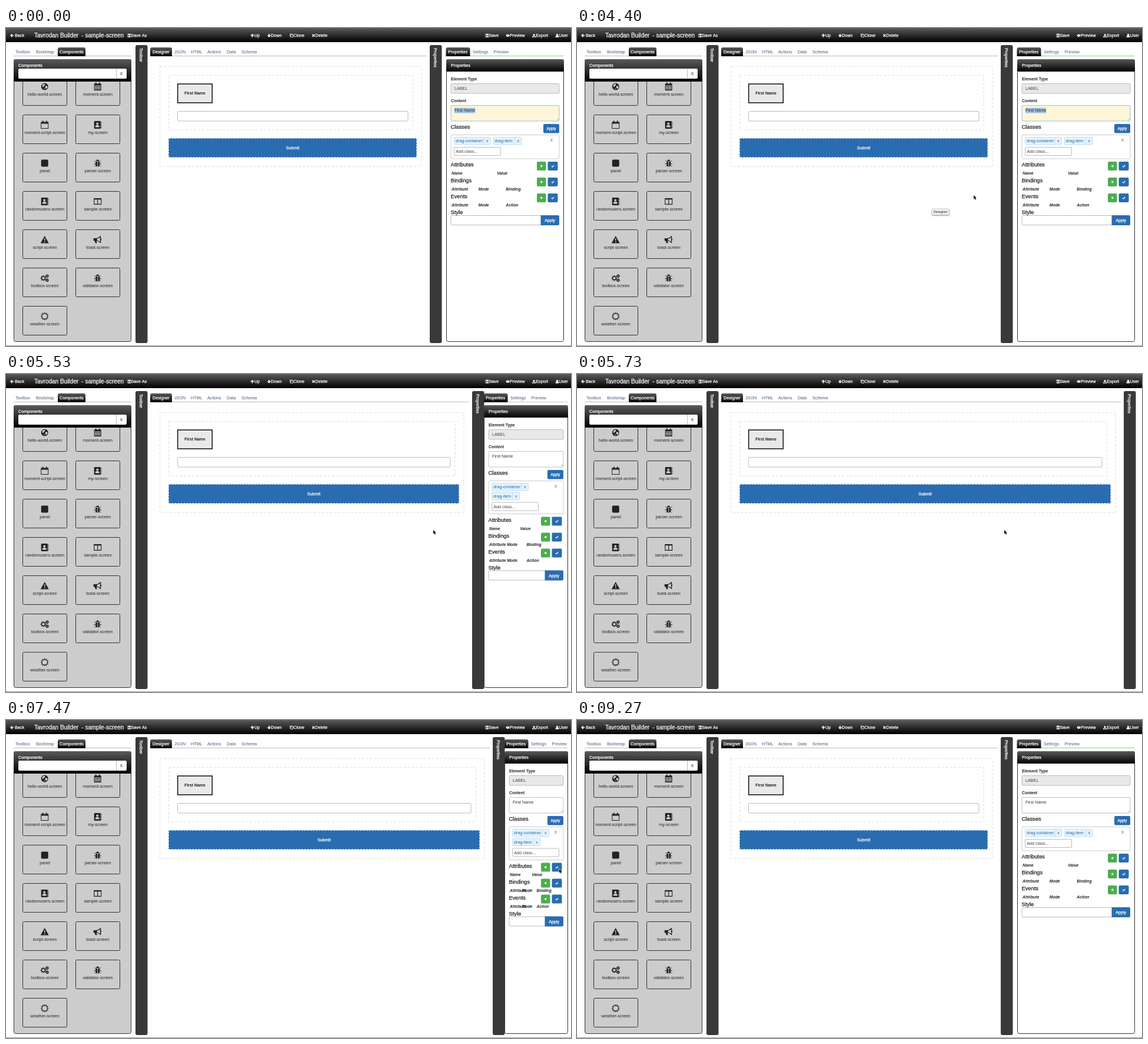
Write an HTML page with a canvas that moves like this. It is 960 px wide and 540 px high and loops after 9730 ms.

```html
<!DOCTYPE html>
<html lang="en">
<head>
<meta charset="utf-8">
<title>Screen designer</title>
<style>
html, body { margin: 0; width: 100%; height: 100%; overflow: hidden; background: #fff; }
canvas { display: block; width: 960px; height: 540px; }
</style>
</head>
<body>
<canvas id="stage" width="960" height="540"></canvas>
<script>
const ctx = document.getElementById('stage').getContext('2d');
const LOOP = 9730, STEP = 200 / 3;
const FACE = '"Liberation Sans", Arial, sans-serif';
const BODY = '7.2px ' + FACE, BOLD = 'bold 6.9px ' + FACE, SLANT = 'italic bold 6.8px ' + FACE;
const HEAD = '9.3px ' + FACE, TITLE = '10px ' + FACE;
const INK = '#222', WHITE = '#fff', LINK = '#465a78', BLUE = '#2a6cb0', GREEN = '#4bae4f';

// Light text on dark and headings get a hairline stroke for weight
function txt(s, x, y, color = INK, font = BODY, align = 'left') {
  ctx.font = font;
  ctx.textAlign = align;
  ctx.fillStyle = ctx.strokeStyle = color;
  ctx.fillText(s, x, y);
  if (color === WHITE || font === HEAD) {
    ctx.lineWidth = .25;
    ctx.strokeText(s, x, y);
  }
}

function box(x, y, w, h, r, fill, line, lw = 1) {
  ctx.beginPath();
  ctx.roundRect(x, y, w, h, r);
  if (fill) { ctx.fillStyle = fill; ctx.fill(); }
  if (line) { ctx.strokeStyle = line; ctx.lineWidth = lw; ctx.stroke(); }
}

function shade(y, h) {
  const g = ctx.createLinearGradient(0, y, 0, y + h);
  g.addColorStop(0, '#5a5a5a');
  g.addColorStop(1, '#000');
  return g;
}

function rule(x1, x2, y, color) {
  ctx.fillStyle = color;
  ctx.fillRect(x1, y, x2 - x1, 1);
}

function dashed(x, y, w, h, color, dash) {
  ctx.setLineDash(dash);
  ctx.strokeStyle = color;
  ctx.lineWidth = 1;
  ctx.strokeRect(x, y, w, h);
  ctx.setLineDash([]);
}

function at(x, y, draw) {
  ctx.save();
  ctx.translate(x, y);
  draw();
  ctx.restore();
}

// Icons: [filled path, stroked path, line width], centred on 0,0
const disc = (x, y, r) => `M${x - r} ${y}a${r} ${r} 0 1 0 ${2 * r} 0a${r} ${r} 0 1 0 ${-2 * r} 0z`;

function rays(x, y, n, r1, r2) {
  let d = '';
  for (let i = 0; i < n; i++) {
    const a = i * 2 * Math.PI / n, c = Math.cos(a), s = Math.sin(a);
    d += `M${x + c * r1} ${y + s * r1}L${x + c * r2} ${y + s * r2}`;
  }
  return d;
}

const gear = (x, y, r) => disc(x, y, r * .62) + rays(x, y, 8, r * .7, r);

function cells() {
  let d = '';
  for (let i = 0; i < 12; i++) d += `M${-5 + i % 4 * 2.6} ${-2 + (i >> 2) * 2.5}h2v1.8h-2z`;
  return d;
}

const TABS = 'M-4-7h2v2h-2zM2-7h2v2h-2z';
const ICON = {
  globe: [disc(0, 0, 6) + 'M-4-3l3-2 2 1-1 2-2 1 0 2-2-1zM1-1l3 0 1 2-2 3-2-2zM-2 3l2 0 0 2z'],
  calendar: ['M-6-5h12v11.5h-12z' + cells() + TABS],
  calendarO: ['M-6.5-5h13v11.5h-13zM-5.5-2h11v7.5h-11z' + TABS],
  book: ['M-5-6.5h10v13h-10q-1 0-1-1v-11q0-1 1-1zM5.6-5h1v2.5h-1zM5.6-1h1v2.5h-1zM5.6 3h1v2.5h-1z'
    + disc(-.5, -2, 2) + 'M-4 4q0-3.5 2-3.5h3q2 0 2 3.5z'],
  square: ['M-4-6h8q2 0 2 2v8q0 2-2 2h-8q-2 0-2-2v-8q0-2 2-2z'],
  bug: ['M-3.5-2.5h3v8.5q-3 0-3-4zM.5-2.5h3v4.5q0 4-3 4zM-2.6-3.2q0-2.8 2.6-2.8t2.6 2.8z',
    'M-3-2l-2.3-2.3M3-2l2.3-2.3M-3.5 1.2h-2.8M3.5 1.2h2.8M-3 3.6l-2.2 2.2M3 3.6l2.2 2.2', 1],
  columns: ['M-6.5-5.5h13v11h-13zM-5.4-3.2h4.8v7.5h-4.8zM.6-3.2h4.8v7.5h-4.8z'],
  warning: ['M0-6.5l7 12.5h-14zM-.9-2.2h1.8l-.3 4h-1.2zM-.8 2.8h1.6v1.6h-1.6z'],
  horn: ['M-7-2.5h5q4-1 6.5-3.7h1v4q2 1.7 0 3.6v4h-1q-2.5-2.8-6.5-3.6l1 4h-2.8l-1.4-4h-1.8zM-1-1.6v2.6q3 .6 5.2 2.4v-7.4q-2.2 1.8-5.2 2.4z'],
  cogs: ['', gear(-2.3, .3, 4.8) + gear(4.2, -3.3, 2.7) + gear(4.2, 3.8, 2.7), 1.5],
  sun: ['', disc(0, 0, 4.7) + rays(0, 0, 12, 5, 6.8), 1.2],
  left: ['M-3 0l3-3 1 1-1.2 1.2h3.2v1.6h-3.2l1.2 1.2-1 1z'],
  save: ['M-3-3h5l1 1v5h-6zM-2.3-2.3v4.6h4.6v-4h-.8v1.5h-3v-2.1zM-1.4 .6h2.8v1.7h-2.8z'],
  clone: ['M-3-3h4.5v1.3h1.5v4.7h-4.5v-1.3h-1.5zM-2.3-2.3v3.3h.8v-2.7h2.3v-.6zM-.8-1v3.3h3.1v-3.3z'],
  times: ['', 'M-2-2l4 4M2-2l-4 4', 1.6],
  eye: ['M-3.3 0q3.3-4.6 6.6 0q-3.3 4.6-6.6 0z' + disc(0, -.2, .7)],
  upload: ['M0-3l2.3 2.3h-1.4v2h-1.8v-2h-1.4zM-3 1h1.6v1h2.8v-1h1.6v2h-6z'],
  user: [disc(0, -1.4, 1.7) + 'M-2.9 3q0-3 1.5-3q1.4 1 2.8 0q1.5 0 1.5 3z'],
  plus: ['', 'M-2 0h4M0-2v4', 1.4],
  check: ['', 'M-2 0l1.5 1.6L2.2-1.6', 1.3]
};

function icon(name, x, y, color = INK, turn = 0) {
  const [fill, line, lw] = ICON[name];
  at(x, y, () => {
    ctx.rotate(turn);
    if (fill) { ctx.fillStyle = color; ctx.fill(new Path2D(fill), 'evenodd'); }
    if (line) { ctx.strokeStyle = color; ctx.lineWidth = lw; ctx.stroke(new Path2D(line)); }
  });
}

function topBar() {
  ctx.fillStyle = shade(0, 24);
  ctx.fillRect(0, 0, 960, 24);
  txt('Tavrodan Builder', 48, 16, WHITE, TITLE);
  txt('- sample-screen', 200, 16, WHITE, TITLE, 'right');
  const items = [
    ['left', 10, 'Back', 15], ['save', 209.5, 'Save As', 212.5], ['left', 418.5, 'Up', 422, Math.PI / 2],
    ['left', 447, 'Down', 450, -Math.PI / 2], ['clone', 485, 'Clone', 488.3], ['times', 522.5, 'Delete', 525.5],
    ['save', 817.5, 'Save', 820.5], ['eye', 852.5, 'Preview', 856], ['upload', 897, 'Export', 900.3], ['user', 936.5, 'User', 939.5]
  ];
  for (const [name, ix, label, x, turn] of items) {
    icon(name, ix, 12.8, WHITE, turn);
    txt(label, x, 15.2, WHITE);
  }
}

function tab(x, w, label, tx) {
  box(x, 33, w, 15, [3, 3, 0, 0], shade(33, 15));
  txt(label, tx, 43.2, WHITE);
}

function panel(x, w, headH, fill) {
  box(x + .5, 53.5, w - 1, 479, 3, fill, '#333');
  box(x, 53, w, headH, [3, 3, 0, 0], shade(53, headH));
}

const TILES = [
  ['hello-world-screen', 'globe'], ['moment-screen', 'calendar'], ['moment-script-screen', 'calendarO'], ['my-screen', 'book'],
  ['panel', 'square'], ['parser-screen', 'bug'], ['randomusers-screen', 'book'], ['sample-screen', 'columns'],
  ['script-screen', 'warning'], ['toast-screen', 'horn'], ['toolbox-screen', 'cogs'], ['validator-screen', 'bug'], ['weather-screen', 'sun']
];

function leftPanel() {
  txt('Toolbox', 16, 43.2, LINK);
  txt('Bootstrap', 51, 43.2, LINK);
  rule(13, 213, 47, '#bbb');
  tab(88, 47, 'Components', 91);
  panel(13, 200, 38, '#ccc');
  txt('Components', 21, 66.3, WHITE);
  box(21, 69, 184, 17, 2, WHITE);
  ctx.fillStyle = '#bbb';
  ctx.fillRect(187, 69, 1, 17);
  txt('X', 196, 80.3, INK, BODY, 'center');
  ctx.save();
  ctx.beginPath();
  ctx.rect(13, 91, 200, 441);
  ctx.clip();
  TILES.forEach(([label, name], i) => {
    const x = 28 + i % 2 * 90, y = 82 + (i >> 1) * 65;
    box(x + .5, y + .5, 75, 49, 2, null, '#333');
    icon(name, x + 37.7, y + 17.5);
    txt(label, x + 38, y + 33.3, INK, BODY, 'center');
  });
  ctx.restore();
}

function sideBar(x, label) {
  box(x, 29, 20.5, 506, 3, '#393939');
  at(x + 7.3, 34, () => {
    ctx.rotate(Math.PI / 2);
    txt(label, 0, 0, WHITE);
  });
}

function designer(edge) {
  [['JSON', 286], ['HTML', 314], ['Actions', 342], ['Data', 375], ['Schema', 400]]
    .forEach(([s, x]) => txt(s, x, 43.2, LINK));
  rule(245, edge - 5, 47, '#bbb');
  tab(245, 37, 'Designer', 249);
  dashed(261.5, 65.5, edge - 275.5, 170, '#ddd', [4, 3]);
  dashed(276.5, 80.5, edge - 305.5, 92.5, '#ddd', [4, 3]);
  box(291.7, 95, 58.6, 32, 0, '#e9e9e9', '#111', 1.5);
  txt('First Name', 321, 113.3, INK, BOLD, 'center');
  box(291.5, 141.5, edge - 328.5, 16.5, 2, WHITE, '#bbb');
  box(276, 187, edge - 298, 33, 2, BLUE);
  dashed(276.5, 187.5, edge - 299, 32, '#cfdeee', [3, 2]);
  txt('Submit', (254 + edge) / 2, 206.2, WHITE, BODY, 'center');
}

function tag(s, x, y, w) {
  box(x + .5, y + .5, w - 1, 12.5, 1.5, '#e6f3fc', '#bcdcf0');
  ctx.fillStyle = '#bcdcf0';
  ctx.fillRect(x + w - 12.5, y + 1, 1, 12);
  txt(s, x + 3, y + 9, '#1b6aa8');
  txt('x', x + w - 6.2, y + 9, '#1b6aa8', BODY, 'center');
}

function propsPanel(l, r, focus, moving) {
  const w = r - l, x = l + 8, fw = w - 15.5;
  if (w < 20) return;
  ctx.save();
  ctx.beginPath();
  ctx.rect(l - 1, 29, w + 2, 506);
  ctx.clip();
  txt('Settings', l + 45, 43.2, LINK);
  txt('Preview', l + 80.5, 43.2, LINK);
  rule(l, r, 47, moving ? '#dcb4dc' : '#8fd08a');
  tab(l - .5, 41, 'Properties', l + 3.3);
  panel(l, Math.round(w), 21, WHITE);
  txt('Properties', x, 66.3, WHITE);

  txt('Element Type', x, 89.3, INK, BOLD);
  box(x, 94.5, fw, 16.5, 2, '#e9e9e9', '#bbb');
  txt('LABEL', l + 14, 105.3, '#444');
  txt('Content', x, 126.3, INK, BOLD);
  box(x, 131.5, fw, 26.5, 2, focus ? '#fff5d9' : WHITE, focus ? '#93c3da' : moving ? '#accbd8' : '#bbb');
  if (focus) {
    ctx.fillStyle = '#9dbfe0';
    ctx.fillRect(l + 14, 135.5, 35, 9);
  }
  txt('First Name', l + 14, 142.3, '#333');
  ctx.strokeStyle = '#999';
  ctx.lineWidth = .6;
  ctx.stroke(new Path2D(`M${r - 12} 157l4-4M${r - 10} 157l2-2`));

  txt('Classes', l + 7.5, 171.3, INK, HEAD);
  box(r - 34.5, 163, 27, 15.5, 2, BLUE);
  txt('Apply', r - 21, 173, WHITE, '6.3px ' + FACE, 'center');
  const wrap = w < 155, dy = wrap ? 15.5 : 0;
  box(x, 181.5, fw, 40.5 + dy, 2, WHITE, '#ccc');
  tag('drag-container', l + 13, 185, 63);
  if (wrap) tag('drag-item', l + 13, 200.5, 48);
  else tag('drag-item', l + 79.5, 185, 49);
  txt('X', r - 20.5, 193.2, '#555', '6.5px ' + FACE, 'center');
  box(l + 13.5, 202.5 + dy, 79, 14, 1.5, WHITE, '#bbb');
  txt('Add class...', l + 16.3, 212 + dy, '#444');

  const groups = [
    ['Attributes', [['Name', 0], ['Value', .432]]],
    ['Bindings', [['Attribute', 0], ['Mode', .275], ['Binding', .508]]],
    ['Events', [['Attribute', 0], ['Mode', .275], ['Action', .508]]]
  ];
  groups.forEach(([name, cols], i) => {
    const y = 227 + dy + i * 27;
    txt(name, l + 7.5, y + 8.3, INK, HEAD);
    box(r - 45.5, y, 15.5, 15, 2, GREEN);
    icon('plus', r - 37.7, y + 7.5, WHITE);
    box(r - 27, y, 17, 15, 2, BLUE);
    icon('check', r - 18.5, y + 7.5, WHITE);
    for (const [s, k] of cols) txt(s, k ? l + k * w : l + 9, y + 22.2, INK, SLANT);
  });
  txt('Style', l + 7.5, 316.3 + dy, INK, HEAD);
  box(x, 318.5 + dy, fw - 4, 16, 2, WHITE, '#bbb');
  box(r - 39, 318 + dy, 31.5, 17, [0, 2, 2, 0], BLUE);
  txt('Apply', r - 23.3, 329 + dy, WHITE, BODY, 'center');
  ctx.restore();
}

function tooltip(alpha) {
  ctx.save();
  ctx.globalAlpha = alpha;
  ctx.shadowColor = 'rgba(0,0,0,.45)';
  ctx.shadowBlur = 2;
  ctx.shadowOffsetY = 1;
  box(603, 307, 29.5, 10.5, 1.5, '#f0f0f0');
  ctx.shadowColor = 'transparent';
  box(603, 307, 29.5, 10.5, 1.5, null, '#b5b5b5', .6);
  txt('Designer', 617.7, 314.3, INK, '6px ' + FACE, 'center');
  ctx.restore();
}

// Pointer path: time, x, y, eased arrival
const PATH = [
  [2533, 287, 514], [2930, 388, 333, 1], [3333, 388, 333], [3930, 596, 292, 1], [4200, 606, 290], [4330, 646, 288],
  [4400, 674, 284], [4700, 718, 269], [5330, 726, 265], [6200, 726, 265], [6930, 940, 253, 1],
  [8333, 940, 253], [8670, 570, 320, 1], [8800, 479, 309], [9200, 479, 309]
];

function pointer(t) {
  for (let i = 1; i < PATH.length; i++) {
    const [t1, x1, y1] = PATH[i - 1], [t2, x2, y2, ease] = PATH[i];
    if (t > t2) continue;
    let k = Math.max(0, (t - t1) / (t2 - t1));
    if (ease) k = k * k * (3 - 2 * k);
    return [x1 + (x2 - x1) * k, y1 + (y2 - y1) * k];
  }
}

const ARROW = new Path2D('M0 0v6.6l1.6-1.4 1.2 2.6 1.2-.6-1.2-2.5h2.1z');
const HAND = new Path2D('M-1 0q1-.8 1.5 0l.3 2.5 2.8.6q1 .3.9 1.5l-.9 3h-3.6l-2.4-3.2q0-1 1-.7l.6.5z');

function drawPointer(t, barX) {
  const [x, y] = pointer(t);
  const hand = x >= barX && x <= barX + 20;
  at(x, y, () => {
    ctx.lineJoin = 'round';
    ctx.lineWidth = hand ? .7 : 1.2;
    ctx.strokeStyle = hand ? '#222' : WHITE;
    ctx.fillStyle = hand ? WHITE : '#000';
    ctx.stroke(hand ? HAND : ARROW);
    ctx.fill(hand ? HAND : ARROW);
  });
}

const swing = p => .5 - Math.cos(Math.PI * Math.min(1, Math.max(0, p))) / 2;

function draw(t) {
  const closing = t > 5440 ? swing((t - 5376) / 400) : 0;
  const shut = closing - swing((t - 7266.6) / 400);
  const barX = Math.round(720 + 215 * shut);
  const moving = shut > .001 && shut < .999;
  ctx.fillStyle = WHITE;
  ctx.fillRect(0, 0, 960, 540);
  topBar();
  leftPanel();
  sideBar(220, 'Toolbar');
  designer(barX);
  if (moving) propsPanel(barX + 20, 954.5, false, true);
  else if (shut < .5) propsPanel(748, 947.5, t < 5440, false);
  sideBar(barX, 'Properties');
  rule(0, 960, 539, '#999');
  if (t >= 4390 && t < 5330) tooltip(Math.min(1, (5330 - t) / 300));
  if (t > 2525 && t < 9200) drawPointer(t, barX);
}

function frame(now) {
  draw(Math.floor((now % LOOP + 5) / STEP) * STEP);
  requestAnimationFrame(frame);
}
draw(0);
requestAnimationFrame(frame);
</script>
</body>
</html>
```
